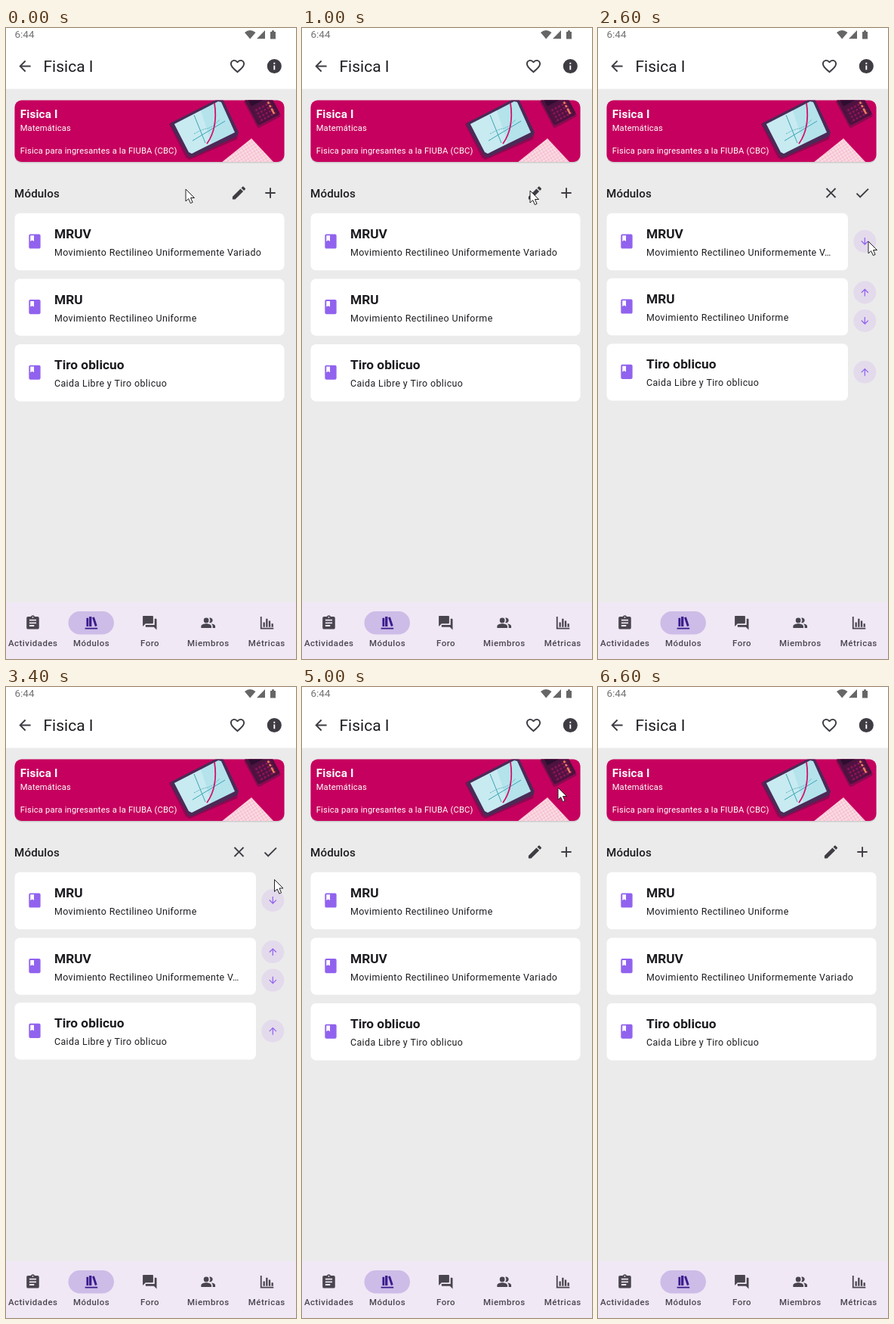
These frames come from a looping animation (384 by 834 pixels, 6900 ms). An HTML page:

```html
<!DOCTYPE html>
<html lang="es">
<head>
<meta charset="utf-8">
<title>Módulos</title>
<style>
  html, body { margin: 0; width: 100%; height: 100%; overflow: hidden; background: #ebebeb; }
  svg { display: block; width: 100%; height: 100%; }
  text { font-family: Roboto, "Noto Sans", sans-serif; fill: #1d1b20; white-space: pre; }
  .title { font-size: 17.3px; font-weight: 700; }
  .sub { font-size: 12.42px; letter-spacing: .4px; }
  .note { font-size: 11.2px; letter-spacing: .17px; fill: #fff; }
  .nav { font-size: 11.46px; font-weight: 500; letter-spacing: .48px; text-anchor: middle; fill: #49454f; }
</style>
</head>
<body>
<svg viewBox="0 0 384 834">
  <defs>
    <clipPath id="banner"><rect x="11.5" y="95.5" width="357" height="81.5" rx="9"/></clipPath>
    <pattern id="grid" width="4" height="4" patternUnits="userSpaceOnUse" patternTransform="rotate(-32)">
      <path d="M0 0H4M0 0V4" stroke="#ee9db8" stroke-width=".8"/>
    </pattern>
    <pattern id="keys" width="5" height="5" patternUnits="userSpaceOnUse">
      <rect x="1" y="1" width="3.2" height="3" rx="1" fill="#8a1557"/>
    </pattern>
  </defs>
  <rect width="384" height="834" fill="#ebebeb"/>
  <rect width="384" height="80.5" fill="#fff"/>

  <text x="11.5" y="13" font-size="13.5" style="fill:#747474">6:44</text>
  <path fill="#666" d="M316 6Q323 0 330.5 6L323.2 14.5ZM332 14.3L343 3V14.3ZM350 5h2V3.2h3V5h2v9.5h-7z"/>
  <text x="49.5" y="57.5" font-size="21">Fisica I</text>

  <rect x="11.5" y="97" width="357" height="81.5" rx="9" fill="#000" opacity=".13"/>
  <g clip-path="url(#banner)">
    <rect x="11" y="95" width="358" height="83" fill="#c6005e"/>
    <path fill="#8b0a50" d="M216 127L220 124 246 166 307 140 306 147 243 174 238 171Z"/>
    <path fill="#4b2a57" d="M219 125L282 93 287 94 308 138 306 143 246 171 241 169 218 129Z"/>
    <path fill="#b4e3ec" d="M223 127L281 97 285 98 303 138 246 166 242 164Z"/>
    <path fill="#d5f1f5" d="M223 127L258 109 272 152 246 166 242 164Z" opacity=".6"/>
    <g fill="none" stroke="#3aa5b3">
      <path d="M249 115L264 152M247 149L290 123"/>
      <path d="M249 140Q259 134 266 133T283 121" stroke-width=".8" stroke-dasharray="2 1"/>
    </g>
    <path d="M276 99Q281 132 266 153" fill="none" stroke="#d0146a" stroke-width="1.8"/>
    <g transform="translate(319 101) rotate(-28)">
      <rect x="-2" y="-6" width="35" height="41" rx="3" fill="#8b0a50"/>
      <rect y="-8" width="33" height="40" rx="3" fill="#4d123f"/>
      <rect x="4" y="-4" width="25" height="9" rx="1" fill="#2d0d30"/>
      <rect x="4" y="9" width="25" height="20" fill="url(#keys)"/>
      <path d="M26 10v3M26 15v3M26 20v8" stroke="#e8825c" stroke-width="2.5"/>
    </g>
    <path id="paper" fill="#fbdbe4" d="M285 178L325 146 355 178Z"/>
    <path fill="url(#grid)" d="M285 178L325 146 355 178Z"/>
  </g>
  <text x="18.7" y="119" font-size="15.3" font-weight="700" letter-spacing=".14" style="fill:#fff">Fisica I</text>
  <text class="note" x="18.7" y="135.5">Matemáticas</text>
  <text class="note" x="18.7" y="166">Fisica para ingresantes a la FIUBA (CBC)</text>

  <text x="11" y="224" font-size="15.2" font-weight="500" letter-spacing=".1">Módulos</text>
  <rect y="759" width="384" height="75" fill="#f0e8f5"/>
  <rect x="82.5" y="771" width="60.5" height="30.5" rx="15.25" fill="#cdbce7"/>

  <g id="fixed"></g>
  <g id="list"></g>
  <circle id="ripple" cy="218" r="18.8"/>
  <g id="tools"></g>
  <path id="cursor" d="M0 0V16l3.7-3.4 2.6 6 2.8-1.2-2.6-5.9h5z" fill="#fff" stroke="#222"/>
</svg>
<script>
const LOOP = 6900, STEP = 100;
const EDIT = 1700, SWAP = 3000, SAVE = 4600;
const DARK = '#3f3c43', PURPLE = '#9162ee';
const $ = id => document.getElementById(id);

// Icon outlines on a 24-unit square
const icons = {
  back: 'M20 11H7.83l5.59-5.59L12 4l-8 8 8 8 1.41-1.41L7.83 13H20z',
  heart: 'M16.5 3c-1.74 0-3.41.81-4.5 2.09C10.91 3.81 9.24 3 7.5 3 4.42 3 2 5.42 2 8.5c0 3.78 3.4 6.86 8.55 11.54L12 21.35l1.45-1.32C18.6 15.36 22 12.28 22 8.5 22 5.42 19.58 3 16.5 3zm-4.4 15.55l-.1.1-.1-.1C7.14 14.24 4 11.39 4 8.5 4 6.5 5.5 5 7.5 5c1.54 0 3.04.99 3.57 2.36h1.87C13.46 5.99 14.96 5 16.5 5c2 0 3.5 1.5 3.5 3.5 0 2.89-3.14 5.74-7.9 10.05z',
  info: 'M12 2a10 10 0 1 0 0 20 10 10 0 0 0 0-20zm1 15h-2v-6h2zm0-8h-2V7h2z',
  pencil: 'M3 17.25V21h3.75L17.81 9.94l-3.75-3.75zM20.71 7.04c.39-.39.39-1.02 0-1.41l-2.34-2.34c-.39-.39-1.02-.39-1.41 0l-1.83 1.83 3.75 3.75z',
  plus: 'M19 13h-6v6h-2v-6H5v-2h6V5h2v6h6z',
  close: 'M19 6.41L17.59 5 12 10.59 6.41 5 5 6.41 10.59 12 5 17.59 6.41 19 12 13.41 17.59 19 19 17.59 13.41 12z',
  check: 'M9 16.17L4.83 12l-1.42 1.41L9 19 21 7l-1.41-1.41z',
  book: 'M18 2H6c-1.1 0-2 .9-2 2v16c0 1.1.9 2 2 2h12c1.1 0 2-.9 2-2V4c0-1.1-.9-2-2-2zM6 4h5v8l-2.5-1.5L6 12z',
  down: 'M20 12l-1.41-1.41L13 16.17V4h-2v12.17l-5.58-5.59L4 12l8 8z',
  up: 'M4 12l1.41 1.41L11 7.83V20h2V7.83l5.58 5.59L20 12l-8-8z',
  tasks: 'M19 3h-4.18a3 3 0 0 0-5.64 0H5c-1.1 0-2 .9-2 2v14c0 1.1.9 2 2 2h14c1.1 0 2-.9 2-2V5c0-1.1-.9-2-2-2zm-7 0a1 1 0 1 1 0 2 1 1 0 0 1 0-2zm2 14H7v-2h7zm3-4H7v-2h10zm0-4H7V7h10z',
  shelf: 'M3 19h18v2H3zM5 5h3v12H5zM9 3h3.5v14H9zM13.3 4.4l3-1 4.2 12.6-3 1z',
  forum: 'M21 6h-2v9H6v2c0 .55.45 1 1 1h11l4 4V7c0-.55-.45-1-1-1zm-4 6V3c0-.55-.45-1-1-1H3c-.55 0-1 .45-1 1v14l4-4h10c.55 0 1-.45 1-1z',
  people: 'M16.67 13.13C18.04 14.06 19 15.32 19 17v3h4v-3c0-2.18-3.57-3.47-6.33-3.87zM15 12a4 4 0 1 0-1.33-7.76 6 6 0 0 1 0 7.52c.42.14.86.24 1.33.24zM9 12a4 4 0 1 0 0-8 4 4 0 0 0 0 8zm0 1c-2.67 0-8 1.34-8 4v3h16v-3c0-2.66-5.33-4-8-4z',
  chart: 'M3 3h2v16h17v2H3zM7 11h2.5v7H7zM11 6h2.5v12H11zM15 9h2.5v9H15zM19 13h2.5v5H19z'
};
const icon = (name, x, y, fill = DARK, k = .955) =>
  `<path d="${icons[name]}" fill="${fill}" fill-rule="evenodd" transform="translate(${x} ${y}) scale(${k}) translate(-12 -12)"/>`;

const nav = [['tasks', 'Actividades'], ['shelf', 'Módulos'], ['forum', 'Foro'], ['people', 'Miembros'], ['chart', 'Métricas']];
$('fixed').innerHTML = icon('back', 25, 50.5) + icon('heart', 306.5, 50.5) + icon('info', 355.3, 50.5) +
  nav.map(([name, label], i) => {
    const x = 35.5 + 77.4 * i;
    return icon(name, x, 786.3, i == 1 ? '#3a1b8c' : '#49454f', name == 'people' ? .85 : .92) +
      `<text class="nav" x="${x + .2}" y="817">${label}</text>`;
  }).join('');

const button = (name, y) =>
  `<circle cx="353.3" cy="${y}" r="15" fill="#e3daec"/>` + icon(name, 353.3, y, PURPLE, .62);

const uniform = 'Movimiento Rectilineo Uniforme';
function drawList(edit, swapped) {
  const rows = [
    ['MRUV', uniform + (edit ? 'mente V…' : 'mente Variado')],
    ['MRU', uniform],
    ['Tiro oblicuo', 'Caida Libre y Tiro oblicuo']
  ];
  if (swapped) rows.unshift(rows.splice(1, 1)[0]);
  const offsets = edit ? [0, swapped ? 86.6 : 86, 172.4] : [0, 86.6, 173.2];
  $('list').innerHTML = rows.map(([title, sub], i) => {
    const y = offsets[i];
    const moves = !edit ? '' : [button('down', 282 + y),
      button('up', 263.5 + y) + button('down', 301 + y), button('up', 282.3 + y)][i];
    return `<rect x="11.5" y="${244.8 + y}" width="${edit ? 319.5 : 357}" height="75.4" rx="7" fill="#fff"/>` +
      icon('book', 38, 282 + y, PURPLE) +
      `<text class="title" x="64" y="${278 + y}">${title}</text>` +
      `<text class="sub" x="64" y="${301 + y}">${sub}</text>` + moves;
  }).join('');
  $('tools').innerHTML = icon(edit ? 'close' : 'pencil', 308.5, 218) + icon(edit ? 'check' : 'plus', 350, 218);
}

// Pointer stops: time, x, y
const path = [
  [0, 238, 213], [800, 300, 215], [1000, 302, 215], [2000, 302, 215], [2500, 355, 279], [2600, 358, 282],
  [3200, 358, 282], [3600, 353, 227], [3700, 352, 222], [4600, 352, 222], [5000, 339, 133], [5200, 330, 114],
  [5500, 309, 67], [5600, 309, 67], [5800, 301, 56], [5900, 301, 56], [6300, 290, -26], [LOOP, 290, -26]
];
function pointer(t) {
  const i = path.findIndex(p => p[0] > t);
  const [t0, x0, y0] = path[i - 1], [t1, x1, y1] = path[i];
  const u = (t - t0) / (t1 - t0);
  return [x0 + (x1 - x0) * u, y0 + (y1 - y0) * u];
}

let state;
function draw(now) {
  const t = Math.floor(now % LOOP / STEP) * STEP;
  const edit = t >= EDIT && t < SAVE, swapped = t >= SWAP;
  const key = `${edit} ${swapped}`;
  if (key != state) drawList(edit, swapped);
  state = key;

  const since = t - (t < SAVE ? EDIT : SAVE);
  $('ripple').setAttribute('cx', t < SAVE ? 308.5 : 350);
  $('ripple').setAttribute('opacity', since < 0 ? 0 : Math.max(0, .09 * (1 - since / 400)));
  $('cursor').setAttribute('transform', `translate(${pointer(t)})`);
  requestAnimationFrame(draw);
}
draw(0);
</script>
</body>
</html>
```
